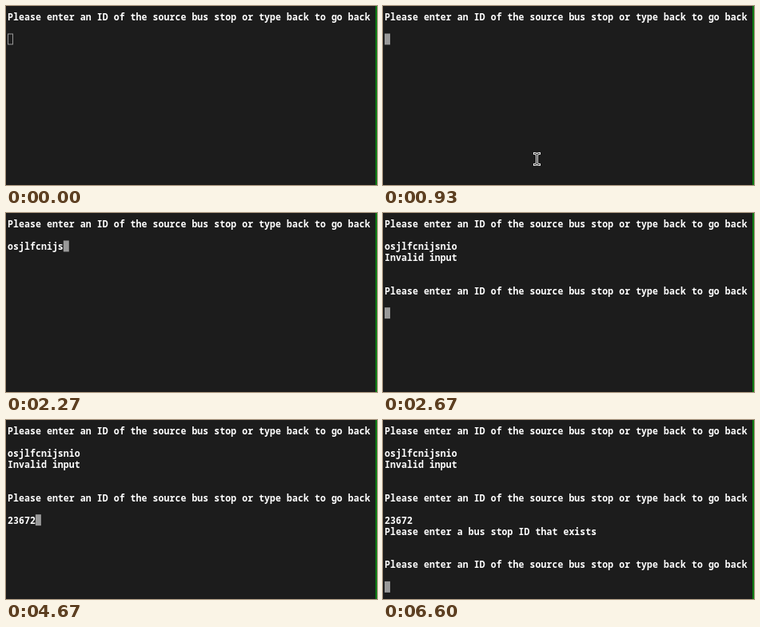
Recreate the animation shown at these times as an HTML page with a canvas. Size 464x224 px, loop 7790 ms.

```html
<!DOCTYPE html>
<html lang="en">
<head>
<meta charset="utf-8">
<title>Bus stop prompt</title>
<style>
html, body { margin: 0; width: 100%; height: 100%; overflow: hidden; background: #1c1c1c; }
canvas { display: block; width: 464px; height: 224px; }
</style>
</head>
<body>
<canvas id="stage"></canvas>
<script>
const W = 464, H = 224, LOOP = 7790;
const CELL = 6.98, LINE = 13.95, LEFT = 2, TOP = 6.6, BASE = 18;
const PROMPT = 'Please enter an ID of the source bus stop or type back to go back';
const FIRST = 'osjlfcnijsnio', SECOND = '23672';
const KEY_TIMES = [3670, 3870, 4200, 4470, 4670];

const canvas = document.getElementById('stage');
const ctx = canvas.getContext('2d');
const ratio = window.devicePixelRatio || 1;
canvas.width = W * ratio;
canvas.height = H * ratio;

const clamp = (v, lo, hi) => Math.min(hi, Math.max(lo, v));

// Fast typing: two screen updates in every 200 ms.
function burstCount(t) {
  const dt = t - 1870;
  if (dt < 0) return 0;
  const updates = 2 * Math.floor(dt / 200) + (dt % 200 >= 60 ? 1 : 0);
  return Math.min(FIRST.length, Math.floor(2.6 * updates + 0.3));
}

// Progress from 0 to 1 that moves in whole screen updates.
function stepped(t, start, interval, count) {
  return clamp(Math.floor((t - start) / interval), 0, count) / count;
}

function write(row, text) {
  ctx.fillStyle = '#fff';
  for (let i = 0; i < text.length; i++) {
    ctx.fillText(text[i], LEFT + (i + 0.5) * CELL, BASE + row * LINE);
  }
}

function block(row, col, focused) {
  const x = LEFT + col * CELL, y = TOP + row * LINE;
  if (focused) {
    ctx.fillStyle = '#999';
    ctx.fillRect(x, y, CELL, LINE);
  } else {
    ctx.strokeStyle = '#999';
    ctx.lineWidth = 1;
    ctx.strokeRect(x + 0.5, y + 0.5, CELL - 1, LINE - 1);
  }
}

function beam(x, y) {
  ctx.save();
  ctx.translate(x + 0.5, y + 0.5);
  ctx.lineCap = 'square';
  ctx.beginPath();
  for (const s of [-1, 1]) {
    ctx.moveTo(-3, s * 7);
    ctx.quadraticCurveTo(-0.5, s * 7, 0, s * 5.5);
    ctx.quadraticCurveTo(0.5, s * 7, 3, s * 7);
  }
  ctx.moveTo(0, -5.5);
  ctx.lineTo(0, 5.5);
  for (const [color, width] of [['#eee', 3], ['#111', 1]]) {
    ctx.strokeStyle = color;
    ctx.lineWidth = width;
    ctx.stroke();
  }
  ctx.restore();
}

function pointer(t) {
  if (t >= 470 && t < 1870) {
    const rise = stepped(t, 470, 200 / 3, 3);
    const settle = stepped(t, 810, 60, 2);
    beam(203 - 5 * rise - 5 * Math.sin(Math.PI * rise) - 6 * settle, 212 - 15 * rise - 6 * settle);
  } else if (t >= 6530 && t < 6600) {
    beam(73, 181);
  }
}

function draw(t) {
  ctx.setTransform(ratio, 0, 0, ratio, 0, 0);
  ctx.fillStyle = '#1c1c1c';
  ctx.fillRect(0, 0, W, H);
  ctx.fillStyle = '#0b7a12';
  ctx.fillRect(462, 0, 2, H);
  ctx.font = 'bold 11.5px "Noto Sans Mono", "DejaVu Sans Mono", monospace';
  ctx.textAlign = 'center';
  ctx.textBaseline = 'alphabetic';

  const first = FIRST.slice(0, burstCount(t));
  const second = SECOND.slice(0, KEY_TIMES.filter(k => t >= k).length);
  let row = 2, col = first.length;
  write(0, PROMPT);
  write(2, first);
  if (t >= 2600) {
    row = 3;
    col = 0;
  }
  if (t >= 2670) {
    write(3, 'Invalid input');
    write(6, PROMPT);
    write(8, second);
    row = 8;
    col = second.length;
  }
  if (t >= 5000) {
    write(9, 'Please enter a bus stop ID that exists');
    write(12, PROMPT);
    row = 14;
    col = 0;
  }
  block(row, col, t >= 870);
  pointer(t);
}

const start = performance.now();
function tick() {
  draw((performance.now() - start) % LOOP);
  requestAnimationFrame(tick);
}
tick();
</script>
</body>
</html>
```
